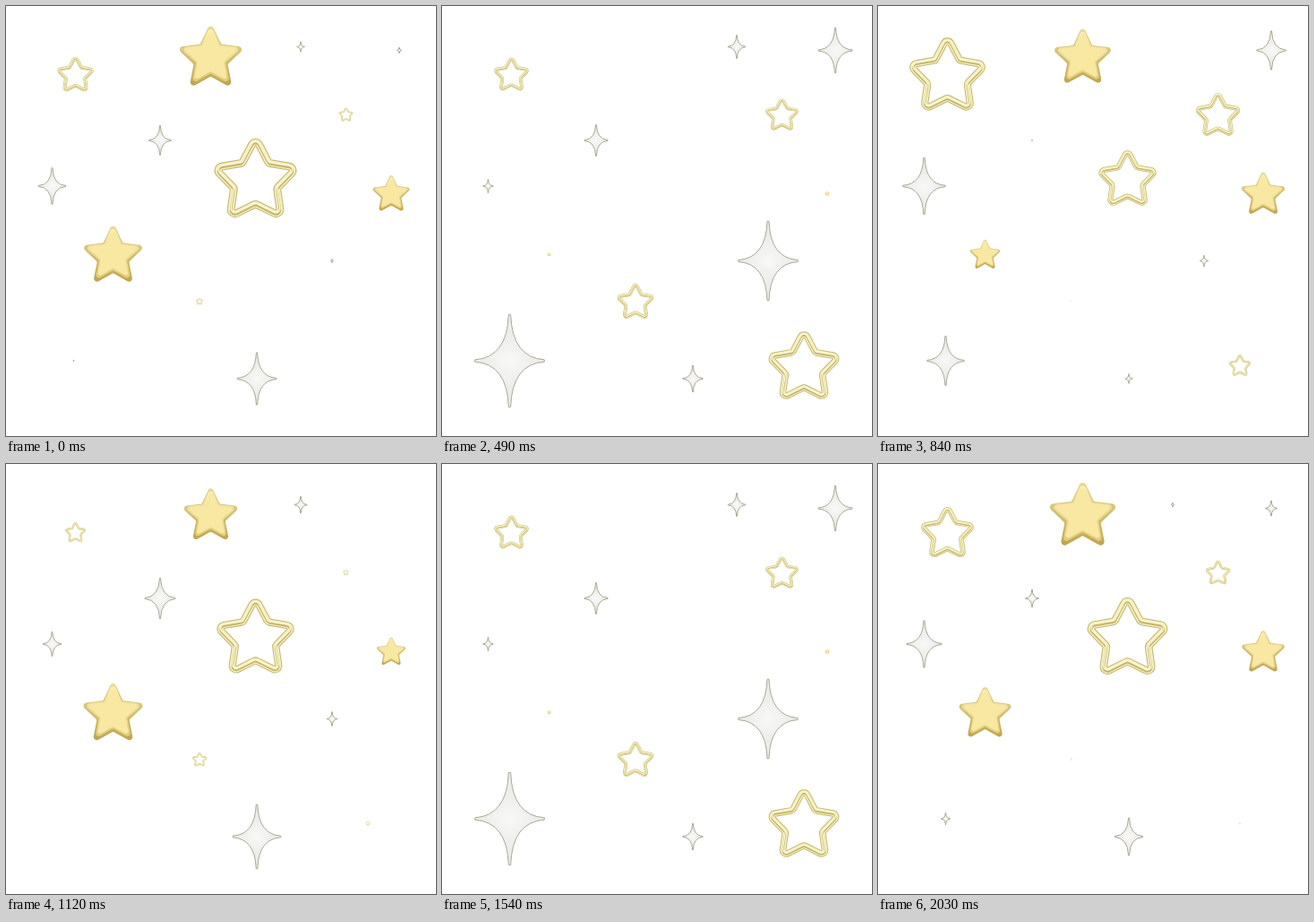
An HTML page with a canvas for the animation above (2100 ms loop, 480x480 px).

```html
<!DOCTYPE html>
<html lang="en">
<head>
<meta charset="utf-8">
<title>Twinkling stars</title>
<style>
html, body { margin: 0; width: 100%; height: 100%; overflow: hidden; background: #fff; }
canvas { display: block; width: 480px; height: 480px; }
</style>
</head>
<body>
<canvas id="stage" width="480" height="480"></canvas>
<script>
const ctx = document.getElementById('stage').getContext('2d');
const TAU = 2 * Math.PI;
const STEP = 70;               // ms per picture
const CYCLE = 15;              // steps from one twinkle to the next
const LAG = 14 / 15;           // steps between neighbours in the list
const FIRST_PEAK = 2.65;

// Five-pointed star with rounded tips and notches
function starPath(outer, inner, tip, notch) {
  const point = i => {
    const a = i * TAU / 10 - TAU / 4, r = i % 2 ? inner : outer;
    return [r * Math.cos(a), r * Math.sin(a)];
  };
  const path = new Path2D(), [x, y] = point(0), [u, v] = point(9);
  path.moveTo((x + u) / 2, (y + v) / 2);
  for (let i = 0; i < 10; i++) {
    path.arcTo(...point(i), ...point(i + 1), i % 2 ? notch : tip);
  }
  path.closePath();
  return path;
}

const ringPath = starPath(53, 27.5, 5, 4);
const goldPath = starPath(60, 29, 5.5, 3);
const facePath = starPath(51, 24, 4, 4);

function gradient(top, bottom) {
  const g = ctx.createLinearGradient(0, -50, 0, 45);
  g.addColorStop(0, top);
  g.addColorStop(1, bottom);
  return g;
}
const rimFill = gradient('#e6da94', '#bda550');
const bevelFill = gradient('#fbf0bd', '#e3c974');

function line(path, width, color, dy = 0) {
  ctx.save();
  ctx.translate(0, dy);
  ctx.lineWidth = width;
  ctx.strokeStyle = color;
  ctx.stroke(path);
  ctx.restore();
}

function fill(path, color, dy = 0) {
  ctx.save();
  ctx.translate(0, dy);
  ctx.fillStyle = color;
  ctx.fill(path);
  ctx.restore();
}

// Turns a painter for a 100-unit star into one for any place and size
const fitted = paint => (x, y, size) => {
  ctx.save();
  ctx.translate(x, y + size * 0.04);
  ctx.scale(size / 100, size / 100);
  paint();
  ctx.restore();
};

const ring = fitted(() => {
  line(ringPath, 9.6, '#c2b772');
  line(ringPath, 7.2, '#f7f0c0');
  line(ringPath, 2.8, '#c5b86c', 0.9);
  line(ringPath, 1.5, '#fdf9dc', -0.9);
});

const gold = fitted(() => {
  fill(goldPath, rimFill);
  fill(facePath, bevelFill, -1.4);
  line(facePath, 2, bevelFill, -1.4);
  ctx.scale(0.92, 0.92);
  fill(facePath, '#f9e8a2', -2);
});

// Four-pointed glint with slightly blunt ends
function glint(x, y, size) {
  const h = (size - 1) / 2, w = h * 0.75, k = 0.07, b = h * 0.022;
  ctx.save();
  ctx.translate(x, y);
  ctx.beginPath();
  for (const [sx, sy] of [[1, -1], [1, 1], [-1, 1], [-1, -1]]) {
    const top = [sx * b, sy * h], side = [sx * w, sy * b];
    const [from, to] = sx * sy < 0 ? [top, side] : [side, top];
    ctx.lineTo(...from);
    ctx.quadraticCurveTo(sx * w * k, sy * h * k, ...to);
  }
  ctx.closePath();
  const shade = ctx.createRadialGradient(0, 0, 0, 0, 0, h * 0.6);
  shade.addColorStop(0, '#f8f8f6');
  shade.addColorStop(1, '#ececea');
  ctx.fillStyle = shade;
  ctx.fill();
  ctx.lineWidth = 1;
  ctx.strokeStyle = '#aaa891';
  ctx.stroke();
  ctx.restore();
}

// Kind, centre and largest size, in the order of twinkling
const stars = [
  [glint, 280, 416, 82], [glint, 172, 150, 63], [glint, 329, 45.5, 36],
  [ring, 216, 329.5, 45], [glint, 364, 284.5, 91], [ring, 404, 401, 79],
  [glint, 75.5, 396, 112], [glint, 439, 49.5, 64], [ring, 379.5, 121, 58],
  [ring, 77.5, 76, 88], [glint, 51.5, 201, 64], [gold, 430, 209, 50],
  [gold, 228.5, 56, 73], [ring, 278.5, 192, 92], [gold, 119.5, 277, 66]
];

function render(ms) {
  const step = Math.floor(ms / STEP) % CYCLE;
  ctx.clearRect(0, 0, 480, 480);
  ctx.lineJoin = 'round';
  stars.forEach(([draw, x, y, max], i) => {
    const peak = FIRST_PEAK + i * LAG;
    const size = max * (1 + Math.cos((step - peak) * TAU / CYCLE)) / 2;
    if (size > 1.6) draw(x, y, size);
  });
}

const start = performance.now();
function tick() {
  render(performance.now() - start);
  requestAnimationFrame(tick);
}
tick();
</script>
</body>
</html>
```
